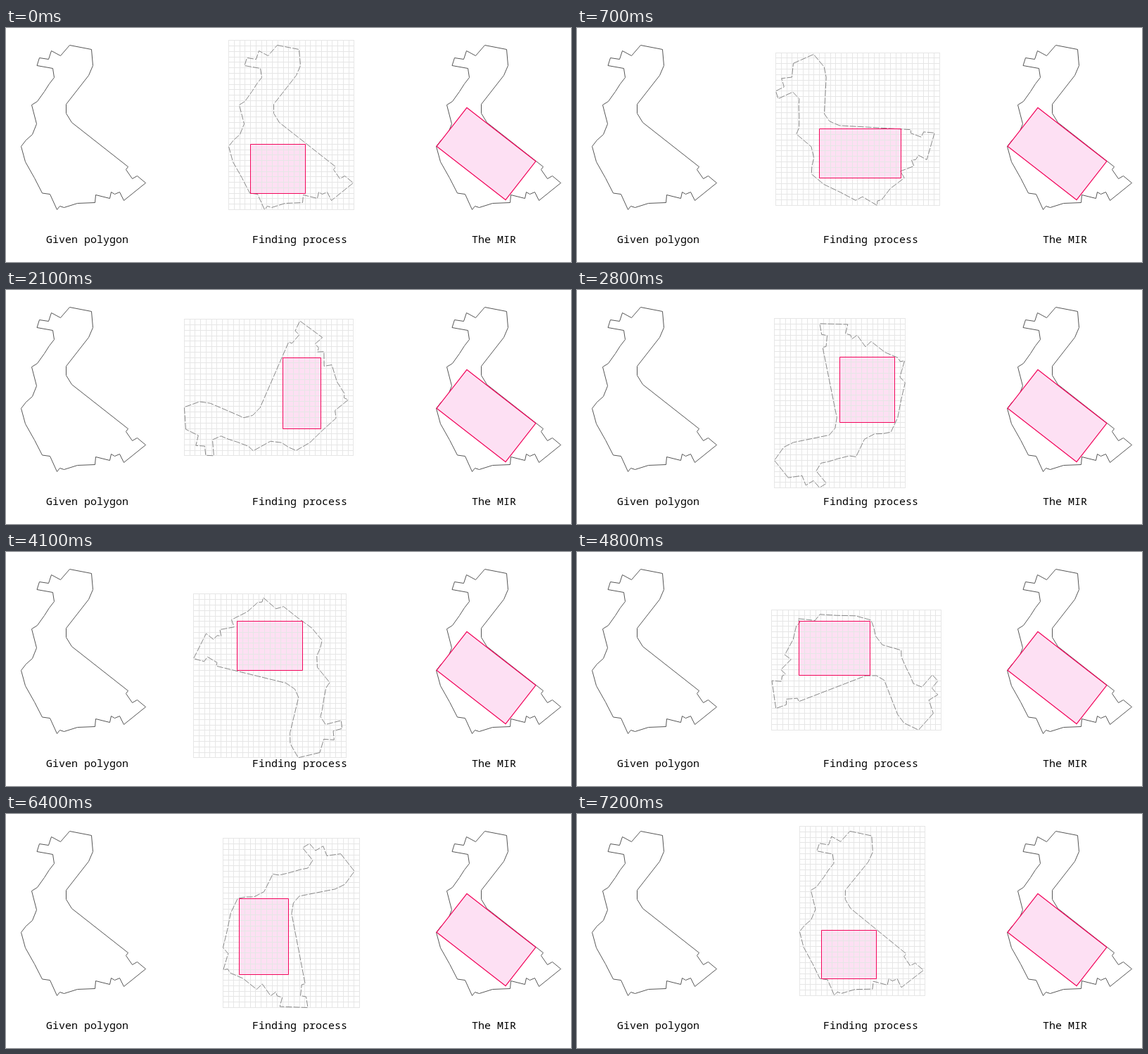
An HTML page with a canvas that plays this animation: 803x333 px, repeating every 7.3 s.

```html
<!DOCTYPE html>
<html lang="en">
<head>
<meta charset="utf-8">
<title>Maximum inscribed rectangle</title>
<style>
html, body { margin: 0; overflow: hidden; background: #fff; }
canvas { display: block; }
</style>
</head>
<body>
<canvas id="stage" width="803" height="333"></canvas>
<script>
const ctx = document.getElementById('stage').getContext('2d');
const STEPS = 73, STEP_MS = 100, CELL = 7.76, PANEL = 295, DEG = Math.PI / 180;
const PINK = '#fde0f3', RED = '#f2055a';

// Key corners, clockwise from the top.
const outline = [
  [90, 24], [121, 30], [123, 53], [117, 67], [85, 108], [85, 121], [93, 134],
  [173, 197], [170, 201], [179, 214], [186, 210], [198, 220],
  [167, 245], [161, 233], [154, 236], [149, 233], [147, 242],
  [127, 237], [126, 248], [101, 249], [82, 255], [76, 253], [72, 258],
  [62, 236], [51, 234.5], [40, 213], [27, 190], [21, 168], [28, 159],
  [37, 151], [43, 136], [36, 109], [44, 104], [54, 90], [61, 79],
  [68, 70], [66, 57], [43.5, 53], [47, 42], [60, 44], [64, 32], [77, 39]
];

function toPath(points) {
  const path = new Path2D();
  points.forEach(([x, y]) => path.lineTo(x + .5, y + .5));
  path.closePath();
  return path;
}

function box(x, y, w, h) {
  const path = new Path2D();
  path.rect(x, y, w, h);
  return path;
}

function stroke(path, color, width = 1) {
  ctx.strokeStyle = color;
  ctx.lineWidth = width;
  ctx.stroke(path);
}

function fill(path, color) {
  ctx.fillStyle = color;
  ctx.fill(path);
}

// Turns the outline counterclockwise and moves it to the middle panel.
function rotate(angle) {
  const c = Math.cos(angle), s = Math.sin(angle), px = 92, py = 161;
  return outline.map(([x, y]) => [
    PANEL + px + (x - px) * c + (y - py) * s,
    py - (x - px) * s + (y - py) * c
  ]);
}

// Largest block of grid nodes that all lie inside; wider blocks win ties.
function largestBlock(cols, rows, inside) {
  const heights = Array(cols + 1).fill(0);
  let top = { area: 0 };
  for (let row = 0; row <= rows; row++) {
    for (let col = 0; col <= cols; col++) heights[col] = inside(col, row) ? heights[col] + 1 : 0;
    for (let left = 0; left <= cols; left++) {
      let h = heights[left] - 1;
      for (let right = left + 1; right <= cols; right++) {
        h = Math.min(h, heights[right] - 1);
        if (h < 1) break;
        const w = right - left, area = w * h;
        if (area > top.area || area === top.area && w > top.w) top = { area, w, h, left, row };
      }
    }
  }
  return top;
}

function drawSearch(angle) {
  const points = rotate(angle), path = toPath(points);
  const xs = points.map(p => p[0]), ys = points.map(p => p[1]);
  const x0 = Math.min(...xs), y0 = Math.max(...ys);
  const cols = Math.ceil((Math.max(...xs) - x0) / CELL);
  const rows = Math.ceil((y0 - Math.min(...ys)) / CELL);
  const gx = col => Math.round(x0 + col * CELL) + .5;
  const gy = row => Math.round(y0 - row * CELL) + .5;

  // The thin stroke gives the inside test a small tolerance.
  ctx.lineWidth = .6;
  const { left, row, w, h } = largestBlock(cols, rows, (col, row) => {
    const x = x0 + col * CELL + .5, y = y0 - row * CELL + .5;
    return ctx.isPointInPath(path, x, y) || ctx.isPointInStroke(path, x, y);
  });
  const x = gx(left), y = gy(row);
  const rect = box(x, y, gx(left + w) - x, gy(row - h) - y);

  const grid = new Path2D();
  for (let col = 0; col <= cols; col++) {
    grid.moveTo(gx(col), gy(0) + .5);
    grid.lineTo(gx(col), gy(rows) - .5);
  }
  for (let row = 0; row <= rows; row++) {
    grid.moveTo(gx(0) - .5, gy(row));
    grid.lineTo(gx(cols) + .5, gy(row));
  }

  fill(rect, PINK);
  stroke(grid, '#e6e6e6');
  ctx.setLineDash([9, 2]);
  stroke(path, '#888');
  ctx.setLineDash([]);
  stroke(rect, RED);
}

function drawResult() {
  const w = 16 * CELL, h = 9 * CELL, rect = box(-w / 2, -h / 2, w, h);
  ctx.save();
  ctx.translate(682.5, 179);
  ctx.rotate(37.9 * DEG);
  fill(rect, PINK);
  stroke(rect, RED, 1.2);
  ctx.restore();
}

const given = toPath(outline);
const solved = toPath(outline.map(([x, y]) => [x + 2 * PANEL, y]));
let shown = -1;

function render() {
  const step = Math.floor(performance.now() / STEP_MS) % STEPS;
  if (step !== shown) {
    shown = step;
    ctx.clearRect(0, 0, 803, 333);
    stroke(given, '#555');
    stroke(solved, '#555');
    drawResult();
    drawSearch(step / (STEPS - 1) * 359 * DEG);
    ctx.fillStyle = '#000';
    ctx.font = '15px "Noto Sans Mono", monospace';
    ctx.fillText('Given polygon', 57, 306);
    ctx.fillText('Finding process', 350, 306);
    ctx.fillText('The MIR', 662, 306);
  }
  requestAnimationFrame(render);
}
render();
</script>
</body>
</html>
```
